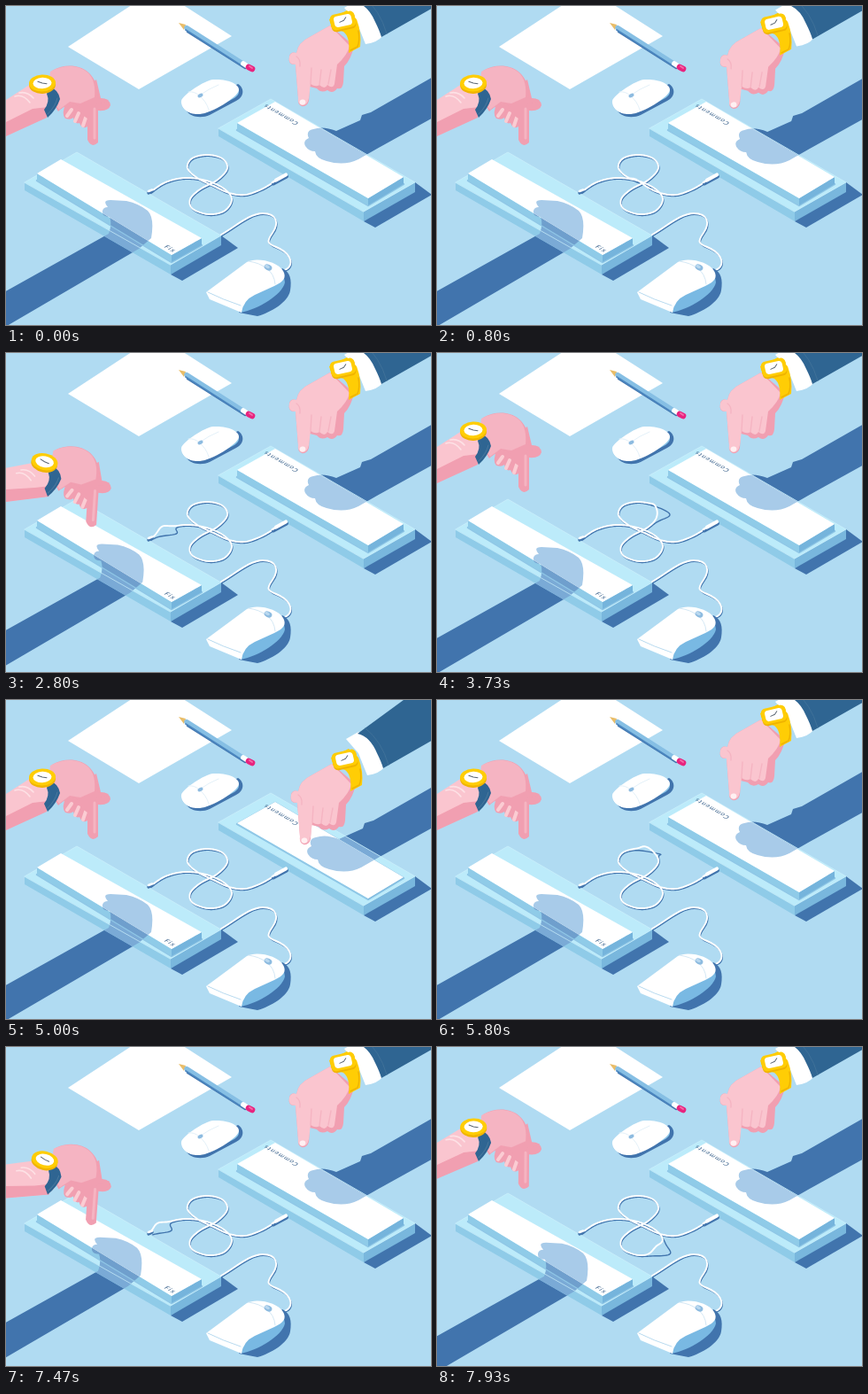
Animation of 480 by 360 pixels, one loop 8 s. Source, as an HTML page with a canvas:

```html
<!DOCTYPE html>
<html lang="en">
<head>
<meta charset="utf-8">
<title>Two buttons</title>
<style>
html, body { margin: 0; width: 100%; height: 100%; overflow: hidden; background: #b0dbf2; }
canvas { display: block; width: 480px; height: 360px; }
</style>
</head>
<body>
<canvas id="stage" width="480" height="360"></canvas>
<script>
const ctx = document.getElementById('stage').getContext('2d');
const LOOP = 8000, CYCLE = 4700;
const C = {
  bg: '#b0dbf2', shade: '#4174ad', rim: '#bcebfa', rimFront: '#8fcbe8', rimSide: '#79b7dd',
  skin: '#fac5cf', skinMid: '#f5b4c2', skinDark: '#f19fb1', gold: '#ffcd05', goldDark: '#f0b400',
  navy: '#2f6592', soft: '#a8cbe9', rimShade: '#7aaad6'
};
const mod = (a, n) => ((a % n) + n) % n;

function fill(d, color) {
  ctx.fillStyle = color;
  ctx.fill(new Path2D(d));
}
function line(d, color, width) {
  ctx.strokeStyle = color;
  ctx.lineWidth = width;
  ctx.lineCap = ctx.lineJoin = 'round';
  ctx.stroke(new Path2D(d));
}
function oval(x, y, rx, ry, angle, color) {
  ctx.fillStyle = color;
  ctx.beginPath();
  ctx.ellipse(x, y, rx, ry, angle, 0, 7);
  ctx.fill();
}
const poly = pts => 'M' + pts.map(p => p.join(' ')).join('L') + 'Z';
const drop = (pts, dy) => pts.map(([x, y]) => [x, y + dy]);
function group(draw) { ctx.save(); draw(); ctx.restore(); }

// Quick press, short hold, slow release; 1 is fully down.
// The shadow follows and, with sway, swings past its rest on release.
function press(t, start, power, sway) {
  const u = mod(t - start, CYCLE);
  if (u < 280) {
    const k = Math.min(1, u / 230), down = k * k * (3 - 2 * k);
    return { down, cast: down };
  }
  const k = Math.max(0, 1 - (u - 280) / 900), down = Math.pow(k, power);
  return { down, cast: down - sway * k * (1 - k) };
}

// Smooth open curve through a few points, sampled with its arc length.
function sample(pts) {
  const out = [];
  let s = 0;
  for (let i = 0; i < pts.length - 1; i++) {
    const a = pts[Math.max(0, i - 1)], b = pts[i], c = pts[i + 1], d = pts[Math.min(pts.length - 1, i + 2)];
    for (let j = 0; j < 14; j++) {
      const k = j / 14;
      const at = n => .5 * (2 * b[n] + (c[n] - a[n]) * k + (2 * a[n] - 5 * b[n] + 4 * c[n] - d[n]) * k * k
        + (3 * b[n] - a[n] - 3 * c[n] + d[n]) * k * k * k);
      const p = { x: at(0), y: at(1) };
      const q = out[out.length - 1];
      if (q) s += Math.hypot(p.x - q.x, p.y - q.y);
      p.s = s;
      out.push(p);
    }
  }
  return out;
}
const cord = sample([[163, 210], [180, 199], [202, 194], [226, 197], [246, 206], [255, 218], [247, 231],
  [229, 235], [211, 229], [208, 218], [219, 207], [239, 196], [250, 183], [244, 172], [227, 168], [210, 172],
  [205, 183], [216, 194], [234, 203], [252, 211], [270, 213], [288, 207], [302, 199]]);
const cordLength = cord[cord.length - 1].s;

function cordPath(pulses, dx, dy) {
  const path = new Path2D();
  for (const p of cord) {
    let bump = 0;
    for (const s of pulses) bump += Math.exp(-Math.pow((p.s - s) / 8.5, 2));
    path.lineTo(p.x + bump * dx, p.y + bump * dy);
  }
  return path;
}
function drawCord(t) {
  const fromLeft = .23 * mod(t - 2720, CYCLE);
  const fromRight = cordLength - .23 * mod(t - 450, CYCLE);
  const pulses = [fromLeft, fromRight].filter(s => s > -25 && s < cordLength + 25);
  group(() => { ctx.translate(.8, 1.4); line(cordPath(pulses, 13, 3), C.shade, 1.4); });
  line(cordPath(pulses, -2, -4), '#fff', 1.9);
  line('M302 200.500L317 192.500', C.shade, 4);
  line('M301 199L306 196', '#fff', 2.6);
  line('M305 196.500L316 190.500', '#fff', 4.2);
  line('M161 211L165 209', C.shade, 3.4);
  line('M161 209L165 207.500', '#fff', 2.6);
}

function drawDesk() {
  ctx.fillStyle = C.bg;
  ctx.fillRect(0, 0, 480, 360);
  fill('M70 46L141 -.5H201L255 34L150 94Z', '#fff');
  group(() => { // pencil
    ctx.translate(0, -1);
    line('M205 30L270 71', C.shade, 2.4);
    fill('M195 20L203 22L201 28Z', '#e9bd68');
    line('M204 25.500L266 65', '#86bfe4', 5.4);
    line('M203 28L264 67', '#4b86bf', 1.8);
    line('M268 66L271 68', '#fff', 5.6);
    line('M274 70L278 72', '#e8247f', 6.6);
    line('M275 69L278 71', '#f46aa8', 2);
  });
  // wireless mouse
  fill('M203 117C208 126 221 127 230 123L260 107C270 102 269 92 262 88Z', C.shade);
  fill('M198 108C198 121 213 124 229 119L256 105C264 101 264 96 262 92Z', '#8cc5e8');
  fill('M198 107C200 100 224 84 234 83C250 82 264 88 263 95C262 103 232 121 219 122C207 123 197 116 198 107Z', '#fff');
  line('M206 97Q213 96 218 101Q226 107 229 117', '#e4f1f9', 1);
  line('M220 100Q228 94 240 89', '#e4f1f9', 1);
  oval(219.500, 101, 3.200, 2, -.5, '#8dbbe0');
}

function drawWiredMouse() {
  const wire = 'M243 258C259 249 275 234 290 234C307 234 308 246 301 256C294 266 295 268 305 272C320 278 324 288 320 294C318 297 315 298 311 299';
  group(() => { ctx.translate(.8, 1.4); line(wire, C.shade, 1.4); });
  line(wire, '#fff', 1.9);
  fill('M263 346L284 350C299 346 319 334 321 321C323 309 321 300 312 296Z', C.shade);
  fill('M262 335L265 346C285 342 312 326 315 312L313 300Z', '#79b9e3');
  fill('M226 323L272 289C282 283 307 288 313 299C317 306 314 311 303 316L281 326Q268 332 266 346L230 331Z', '#fff');
  line('M228 323Q244 331 265 338', '#b9dbf0', 1);
  line('M274 288Q287 290 294 296Q303 302 304 314', '#d4e8f5', 1);
  oval(296, 295, 4.600, 3.200, .45, '#8dbbe0');
  oval(295, 294, 3, 1.800, .45, '#b9d8ef');
}

function label(text, x, y, dir) {
  group(() => {
    ctx.transform(.87 * dir, .5 * dir, -.8 * dir, .5 * dir, x, y);
    ctx.font = '500 7.4px Lato, "Open Sans", sans-serif';
    ctx.letterSpacing = '1px';
    ctx.fillStyle = '#3f668f';
    ctx.fillText(text, 0, 0);
  });
}

// base and pad list their corners as left, top, right, bottom
function drawKey(key, { down, cast }) {
  const { base, pad, shadow } = key;
  const [sx, sy] = [key.shift[0] * cast, key.shift[1] * cast];
  const inShadow = (area, color) => group(() => {
    ctx.clip(new Path2D(area));
    ctx.translate(sx, sy);
    fill(shadow, color);
  });
  group(() => { ctx.translate(sx, sy); fill(shadow, C.shade); });
  const [l, , r, b] = base;
  fill(poly([[b[0], b[1] + 11], [b[0] + 13, b[1] + 18], [r[0] + 19, r[1] + 14], r]), C.shade);
  fill(poly([l, b, [b[0], b[1] + 11], [l[0], l[1] + 9]]), C.rimFront);
  fill(poly([b, r, [r[0], r[1] + 11], [b[0], b[1] + 11]]), C.rimSide);
  fill(poly(base), C.rim);
  inShadow(poly([l, base[1], r, [r[0], r[1] + 11], [b[0], b[1] + 11], [l[0], l[1] + 9]]), C.rimShade);
  line(poly(base), '#cdf1fc', .7);

  const top = drop(pad, 7 * Math.max(0, (down - .8) / .2)), foot = drop(pad, 8);
  line(poly(foot), '#8fc6e6', 2.5);
  fill(poly([top[0], top[3], foot[3], foot[0]]), C.rimFront);
  fill(poly([top[3], top[2], foot[2], foot[3]]), '#75b4dc');
  inShadow(poly([top[0], top[2], foot[2], foot[3], foot[0]]), '#6f9fcd');
  fill(poly(top), '#fff');
  inShadow(poly(top), C.soft);
  group(() => { ctx.translate(0, top[0][1] - pad[0][1]); label(...key.label); });
}

const leftKey = {
  base: [[21, 199], [80, 165], [243, 259], [186, 292]],
  pad: [[35, 189], [62, 173], [221, 262], [187, 281]],
  shift: [-22, -8],
  shadow: 'M-40 344L116 257Q120 246 117 238Q108 238 109 231Q110 227 115 227Q108 219 118 219L136 220Q150 223 160 231Q168 239 164 262L150 274L-40 385Z',
  label: ['Fix', 178, 272, 1]
};
const rightKey = {
  base: [[240, 138], [299, 105], [462, 199], [404, 232]],
  pad: [[261, 132], [304, 108], [449, 193], [409, 217]],
  shift: [3, 16],
  shadow: 'M540 47L412 120L402 123L400 129L373 141Q358 135 347 139Q338 141 342 149Q335 152 338 158Q342 164 349 164Q350 172 362 175Q382 181 398 173L419 161L540 94Z',
  label: ['Comments', 331, 132, -1]
};

function watch(x, y, angle) {
  group(() => {
    ctx.translate(x, y);
    ctx.rotate(angle);
    oval(0, 2, 15, 10, 0, C.goldDark);
    oval(0, 0, 15, 9.500, 0, C.gold);
    oval(0, 0, 10.500, 6.300, 0, '#fff');
    line('M-5 -2L0 0L5 1', '#5b6672', 1);
  });
}

function drawLeftHand(p) {
  const far = 24 * p, dx = 4 * p, dy = 60 * p;
  fill(poly([[-20, 119 + far], [28 + dx, 88 + dy], [54 + dx, 84 + dy], [52 + dx, 119 + dy], [44 + dx, 126 + dy], [-20, 156 + far]]), C.skin);
  fill(poly([[-20, 141 + far], [30 + dx, 116 + dy], [48 + dx, 114 + dy], [46 + dx, 126 + dy], [-20, 156 + far]]), C.skinDark);
  group(() => {
    ctx.translate(45 + dx, 90 + dy);
    ctx.rotate(.11 * p);
    ctx.translate(-45, -90);
    line('M10 102Q19 99 27 109M15 98Q24 96 31 104', '#fde1e5', 1.6);
    // curled fingers and pointing finger
    fill('M68 108Q62 122 67 127Q73 129 76 126Q78 134 83 132Q86 140 92 136L92 151Q97 161 104 154L104 118Q116 119 118 112Q117 104 107 104L102 83Z', C.skinDark);
    line('M69 124L74 117M78 130L82 121M87 135L90 126', '#fbccd3', 4);
    fill('M52 73C66 65 82 66 92 74C102 82 104 94 104 104L116 106Q112 110 103 110L92 127Q86 124 85 116Q80 111 73 110Q64 114 59 119L47 100Z', C.skinDark);
    fill('M50 74C66 65 82 67 91 74C100 81 101 93 100 103L84 110L72 108L60 117L47 100Z', C.skinMid);
    line('M100 116V149', C.skinMid, 3);
    fill('M50 92Q59 94 61 105Q57 117 47 126L43 117Q50 108 46 99Z', C.navy);
    line('M47 122Q56 113 58 104', '#49799e', 1);
    watch(41, 87, -.05 + .3 * p);
  });
}

function drawRightHand(p) {
  group(() => { // sleeve
    ctx.translate(2 * p, 42 * p);
    fill('M382 2L396 -6L414 0L425 34Q420 41 406 43L396 18Z', '#fff');
    fill('M395 -4Q409 -1 417 18Q422 28 424 35L540 -31V-110Z', C.navy);
    line('M404 -10Q422 4 430 31', '#3f7199', 1);
  });
  group(() => {
    ctx.translate(2 * p, 50 * p);
    // fist
    fill('M366 22L393 45Q390 60 382 68L381 86Q380 95 374 93Q369 100 363 95Q356 99 351 93L343 91L342 107Q340 114 334 113Q329 111 330 104L327 66Q318 67 320 57Q321 51 328 53Q330 41 343 35Z', C.skinDark);
    fill('M366 22L388 45Q386 55 374 66L371 88Q369 94 363 89Q360 95 354 89Q350 92 344 88L342 104Q340 113 334 112Q329 110 330 104L327 66Q318 66 320 57Q322 51 328 53Q330 41 343 35Z', C.skin);
    line('M344 88L345 70M354 89L356 72M364 88L367 72', C.skinMid, 1.4);
    line('M328 57Q333 60 332 68', C.skinMid, 1.3);
    oval(335, 108.500, 3.400, 3, -.2, '#fff0f2');
    // gold strap
    fill('M365 15L385 5L396 15Q402 31 400 46L387 53Q389 35 381 29L368 25Z', C.gold);
    line('M398 28Q400 39 397 46L389 50', C.goldDark, 1.5);
    group(() => {
      ctx.translate(380.500, 16.500);
      ctx.rotate(-.22);
      const frame = (w, h, r, color) => {
        ctx.fillStyle = color;
        ctx.beginPath();
        ctx.roundRect(-w, -h, w * 2, h * 2, r);
        ctx.fill();
      };
      group(() => { ctx.translate(0, 1.500); frame(14, 9.500, 5, C.goldDark); });
      frame(14, 9, 5, C.gold);
      frame(10, 6.200, 3.500, '#fff');
      line('M-4 1L1 0L4 -3', '#5b6672', 1);
    });
  });
}

function render(t) {
  const left = press(t, 2380, 3, 1.2), right = press(t, 60, 4, 0);
  drawDesk();
  drawKey(rightKey, right);
  drawKey(leftKey, left);
  drawCord(t);
  drawWiredMouse();
  drawLeftHand(left.down);
  drawRightHand(right.down);
}

const begin = performance.now();
function tick() {
  render((performance.now() - begin) % LOOP);
  requestAnimationFrame(tick);
}
tick();
</script>
</body>
</html>
```
